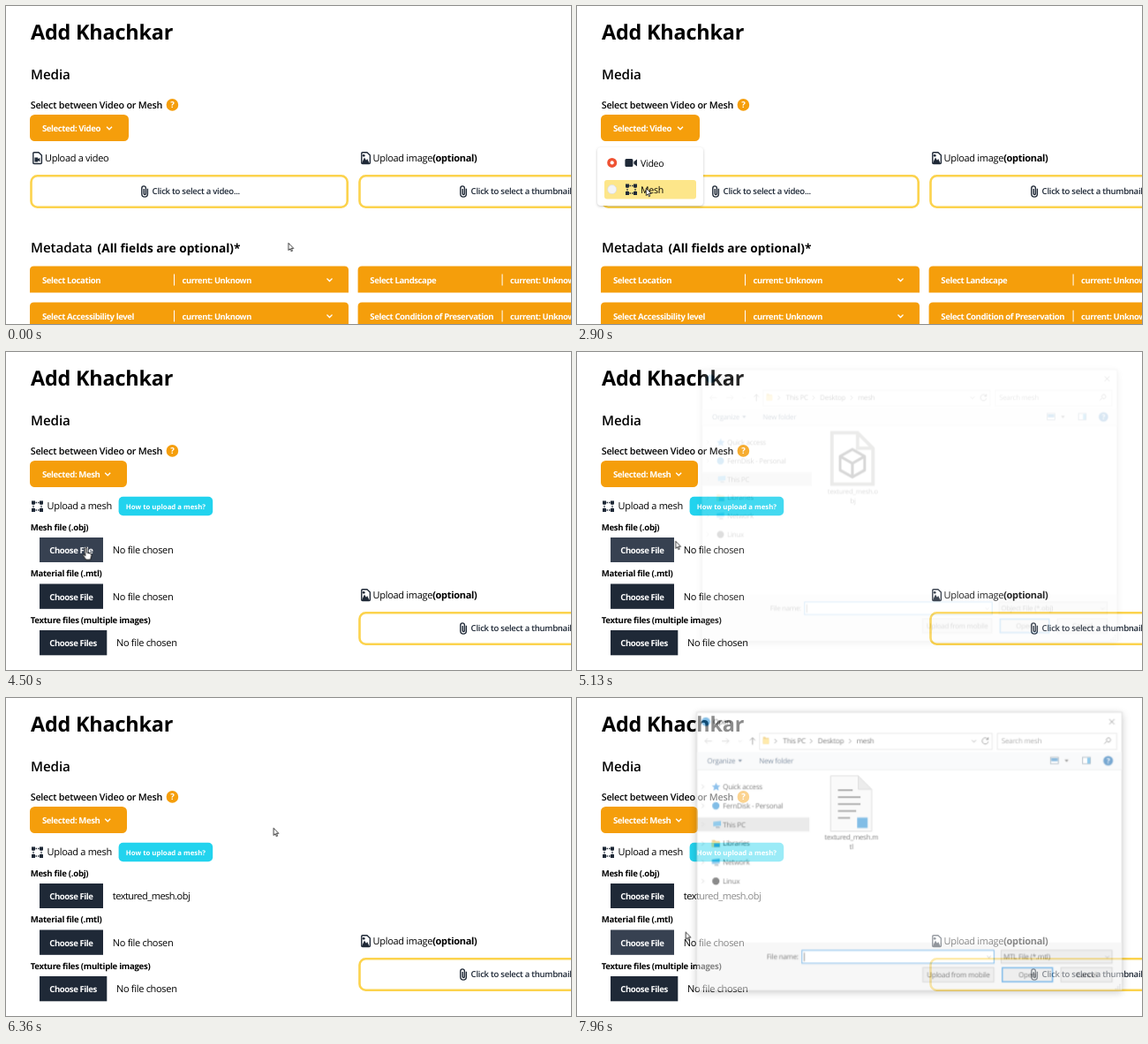
An HTML page that plays this animation: 640 by 360 pixels, repeating every 8 s.

```html
<!DOCTYPE html>
<html lang="en">
<head>
<meta charset="utf-8">
<title>Add Khachkar</title>
<style>
html, body { margin: 0; width: 100%; height: 100%; overflow: hidden; background: #fff; }
svg { display: block; width: 640px; height: 360px; }
text { font: 400 11px "Open Sans", "Noto Sans", sans-serif; letter-spacing: -.028em; white-space: pre; text-rendering: geometricPrecision; }
.h1 { font-size: 23.4px; font-weight: 700; letter-spacing: -.2px; }
.h2 { font-size: 15.2px; font-weight: 600; letter-spacing: -.1px; }
.note { font-size: 13.7px; font-weight: 700; letter-spacing: 0; }
.lead { font-size: 10.8px; font-weight: 600; letter-spacing: -.023em; }
.btn { font-size: 9.6px; font-weight: 600; letter-spacing: -.03em; }
.btn.w { font-weight: 700; letter-spacing: -.045em; }
.name { letter-spacing: -.045em; }
.b { font-weight: 700; }
.w { fill: #fff; }
.mid { text-anchor: middle; }
.amber { fill: #f59e0b; }
.ink { fill: #1f2937; }
.line { fill: none; stroke: #1f2937; stroke-width: 1.4; }
.chev { fill: none; stroke: #fff; stroke-width: 1.3; }
.frame { fill: #fff; stroke: #fcd34d; stroke-width: 2.6; }
.win text { font-size: 8.2px; fill: #1a1a1a; }
.win .nav { fill: #1e395b; }
.win .dim { fill: #6d6d6d; }
.win .file { font-size: 8px; text-anchor: middle; }
.thin { fill: none; stroke: #555; stroke-width: .9; }
.pale { stroke: #bbb; }
.ctl { fill: #e1e1e1; stroke: #adadad; stroke-width: .8; }
.blue { fill: #1b87d2; }
.shadow { filter: drop-shadow(0 2px 5px rgba(0, 0, 0, .38)); }
.soft { filter: drop-shadow(0 1px 1.5px rgba(0, 0, 0, .22)); }
.ptr { fill: #fff; stroke: #111; stroke-width: .8; stroke-linejoin: round; }

/* 1% of the loop is 80 ms */
.t { animation: 8s step-end infinite; }
.video { animation-name: video; }
.mesh { animation-name: mesh; }
#below { animation-name: below; }
#sel { animation-name: sel; }
#drop { animation-name: drop; }
#menu { animation-name: menu; }
#rowVideo { animation-name: rowVideo; }
#rowMesh { animation-name: rowMesh; }
#pick1 { animation-name: pick1; }
#pick2 { animation-name: pick2; }
#empty { animation-name: empty; }
#chosen { animation-name: chosen; }
#tip { animation-name: tip; }
#over { animation-name: over; }
.marked { animation-name: marked; }
#caret { animation-name: caret; }
.obj { animation-name: obj; }
.mtl { animation-name: mtl; }
#arrow { animation-name: arrow; }
#hand { animation-name: hand; }
#win { animation: win 8s linear infinite; transform-origin: 376.5px 173.5px; }
#cursor { animation: move 8s ease-in-out infinite; }

@keyframes video { 0% { opacity: 1 } 37.5%, 100% { opacity: 0 } }
@keyframes mesh { 0% { opacity: 0 } 37.5%, 100% { opacity: 1 } }
@keyframes below { 0% { transform: none } 37.5%, 100% { transform: translateY(103px) } }
@keyframes sel { 0%, 30%, 100% { fill: #f59e0b } 14.6% { fill: #b45309 } }
@keyframes drop { 0%, 12.5%, 100% { fill: #fff } 11.1% { fill: #fef3c7 } }
@keyframes menu { 0%, 37.5%, 100% { opacity: 0 } 24.5% { opacity: 1 } }
@keyframes rowVideo { 0%, 31.8%, 100% { opacity: 0 } 30.75% { opacity: 1 } }
@keyframes rowMesh { 0%, 37.5%, 100% { opacity: 0 } 32.6% { opacity: 1 } }
@keyframes pick1 { 0%, 76.9%, 100% { fill: #1f2937 } 48.1% { fill: #374151 } }
@keyframes pick2 { 0% { fill: #1f2937 } 89.25%, 100% { fill: #374151 } }
@keyframes empty { 0% { opacity: 1 } 76.9%, 100% { opacity: 0 } }
@keyframes chosen { 0% { opacity: 0 } 76.9%, 100% { opacity: 1 } }
@keyframes tip { 0%, 56.25%, 100% { opacity: 0 } 54.125% { opacity: 1 } }
@keyframes over { 0%, 72.5%, 100% { opacity: 0 } 70% { opacity: 1 } }
@keyframes marked { 0%, 80%, 100% { opacity: 0 } 72.5% { opacity: 1 } }
@keyframes caret { 0%, 80%, 100% { opacity: 1 } 72.5% { opacity: 0 } }
@keyframes obj { 0% { opacity: 1 } 80%, 100% { opacity: 0 } }
@keyframes mtl { 0% { opacity: 0 } 80%, 100% { opacity: 1 } }
@keyframes hand {
  0%, 12.5%, 30%, 63.75%, 98.25%, 100% { opacity: 0 }
  11.1%, 14.6%, 48.1%, 89.25% { opacity: 1 }
}
@keyframes arrow {
  0%, 12.5%, 30%, 63.75%, 98.25%, 100% { opacity: 1 }
  11.1%, 14.6%, 48.1%, 89.25% { opacity: 0 }
}
@keyframes win {
  0%, 63.75% { opacity: 0; transform: scale(.95) }
  66.25%, 75.6% { opacity: 1; transform: none }
  77.5%, 98.25% { opacity: 0; transform: scale(.95) }
  99.5%, 100% { opacity: .55; transform: scale(.981) }
}
@keyframes move {
  0%, 7.5% { transform: translate(319.6px, 268px) }
  16.625%, 27.875% { transform: translate(117px, 136px) }
  34.125% { transform: translate(78px, 206px) }
  40% { transform: translate(78px, 206px); animation-timing-function: ease-in }
  42.5% { transform: translate(99px, 190px); animation-timing-function: ease-out }
  45% { transform: translate(116.5px, 184px); animation-timing-function: ease-in }
  47.5% { transform: translate(107px, 204px); animation-timing-function: ease-out }
  50% { transform: translate(90px, 221px) }
  50.75%, 62% { transform: translate(90.5px, 221.5px) }
  72% { transform: translate(313.5px, 139px) }
  77.5% { transform: translate(313.5px, 139px); animation-timing-function: ease-in }
  82.5% { transform: translate(264px, 175px); animation-timing-function: cubic-bezier(.3, .4, .6, .95) }
  88.75% { transform: translate(109px, 262px); animation-timing-function: ease-out }
  92%, 96.25% { transform: translate(98px, 272px) }
  99.5%, 100% { transform: translate(122.8px, 264.6px) }
}
</style>
</head>
<body>
<svg viewBox="0 0 640 360">
  <defs>
    <path id="v" d="M-3-1.5 0 1.5 3-1.5"/>
    <path id="gt" d="M-1.2-2.4 1.2 0-1.2 2.4"/>
    <path id="tri" d="M-2.2-1.2h4.4L0 1.4z"/>
    <path id="doc" class="line" d="M.8 1.8q0-1.1 1.1-1.1h5L10.4 4v8.4q0 1.1-1.1 1.1H1.9q-1.1 0-1.1-1.1z"/>
    <path id="clip" class="line" d="M8.4 4v6a3.3 3.3 0 0 1-6.6 0V3.4a2.3 2.3 0 0 1 4.6 0v6.2a1.1 1.1 0 0 1-2.2 0V4.2"/>
    <g id="net">
      <path class="line" d="M2 2h9v8.5h-9z" stroke-dasharray="1.5 1"/>
      <path class="ink" d="M0 0h4v4H0zM9 0h4v4H9zM0 8.5h4v4H0zM9 8.5h4v4H9z"/>
    </g>
    <path id="cam" class="ink" d="M0 1.5Q0 0 1.5 0h6Q9 0 9 1.5v6Q9 9 7.5 9h-6Q0 9 0 7.5zM10 3.3 13.6.6v7.8L10 5.7z"/>
    <g id="bar">
      <path class="amber" d="M27 324.5V299q0-4.6 4.6-4.6h351.8q4.6 0 4.6 4.6v25.5z"/>
      <path stroke="#fff" d="M190.5 303.5v13"/>
      <text class="btn w" style="font-size:9.4px" x="199.5" y="313.5">current: Unknown</text>
      <use href="#v" class="chev" x="366.5" y="310"/>
    </g>
    <g id="folder">
      <path fill="#e8b53a" d="M0 0h3.5l1 1.2H9V8H0z"/>
      <path fill="#ffd968" d="M0 2.4h9V8H0z"/>
    </g>
    <g id="pc">
      <path fill="#3aa0dc" d="M0 1 9 0v5.6L0 6.2z"/>
      <path fill="#7b8c99" d="M3 6.6h4l1 1.6H3z"/>
    </g>
  </defs>

  <rect width="640" height="360" fill="#fff"/>
  <text class="h1" x="28" y="37.6">Add Khachkar</text>
  <text class="h2" x="28" y="82.6">Media</text>
  <text class="lead" x="27.7" y="116">Select between Video or Mesh</text>
  <circle class="amber" cx="188.4" cy="111.9" r="6.8"/>
  <text class="btn w mid" x="188.4" y="115.4">?</text>

  <g class="t video">
    <rect id="sel" class="t amber" x="27" y="123" width="112" height="30" rx="5.5"/>
    <text class="btn w" x="41" y="142">Selected: Video</text>
    <use href="#v" class="chev" x="117" y="138.3"/>
    <use href="#doc" x="30" y="165"/>
    <path class="ink" d="M32.4 171.5h3.8v1.6l2.2-1.2v4.4l-2.2-1.2v1.5h-3.8z"/>
    <text x="44" y="176.4">Upload a video</text>
    <rect id="drop" class="t frame" x="28.5" y="192.3" width="358.2" height="35.4" rx="7"/>
    <use href="#clip" x="152" y="202.8"/>
    <text class="btn ink" x="165.6" y="213">Click to select a video...</text>
  </g>

  <g id="below" class="t">
    <use href="#doc" x="402" y="165"/>
    <path class="ink" d="M403 178l3-6.4 2 3.2 1.2-1.8 2.4 5z"/>
    <circle class="ink" cx="405.2" cy="169.3" r="1.4"/>
    <text x="415.6" y="176.4">Upload image<tspan class="b">(optional)</tspan></text>
    <rect class="frame" x="400.5" y="192.3" width="358.2" height="35.4" rx="7"/>
    <use href="#clip" x="513" y="202.8"/>
    <text class="btn ink" x="526.6" y="213">Click to select a thumbnail...</text>
    <text class="h2" x="28" y="279">Metadata</text>
    <text class="note" x="103.6" y="279">(All fields are optional)*</text>
    <use href="#bar"/>
    <use href="#bar" x="371.6"/>
    <use href="#bar" y="41"/>
    <use href="#bar" x="371.6" y="41"/>
    <text class="btn w" x="41" y="313.5">Select Location</text>
    <text class="btn w" x="412.3" y="313.5">Select Landscape</text>
    <text class="btn w" x="41" y="354.5">Select Accessibility level</text>
    <text class="btn w" x="412.3" y="354.5">Select Condition of Preservation</text>
  </g>

  <g class="t mesh">
    <rect class="amber" x="27" y="123" width="110" height="30" rx="5.5"/>
    <text class="btn w" x="41" y="142">Selected: Mesh</text>
    <use href="#v" class="chev" x="115.2" y="138.3"/>
    <use href="#net" x="29" y="168.5"/>
    <text x="46.6" y="178.4">Upload a mesh</text>
    <rect x="127.6" y="163.7" width="106.6" height="21.6" rx="5" fill="#22d3ee"/>
    <text class="btn w" style="font-size:7.8px;letter-spacing:0" x="135.8" y="177.5">How to upload a mesh?</text>
    <text class="btn b" x="27.7" y="201.8">Mesh file (.obj)</text>
    <text class="btn b" x="27.7" y="254.4">Material file (.mtl)</text>
    <text class="btn b" x="27.7" y="307">Texture files (multiple images)</text>
    <rect id="pick1" class="t ink" x="38" y="210" width="72" height="28"/>
    <rect id="pick2" class="t ink" x="38" y="262.5" width="72" height="28.3"/>
    <rect class="ink" x="38" y="315" width="76.3" height="28.3"/>
    <text class="btn w" x="49.3" y="228">Choose File</text>
    <text class="btn w" x="49.3" y="280.6">Choose File</text>
    <text class="btn w" x="49.3" y="333.2">Choose Files</text>
    <text id="empty" class="t" x="120.8" y="228">No file chosen</text>
    <text id="chosen" class="t name" x="120.8" y="228">textured_mesh.obj</text>
    <text x="120.8" y="280.6">No file chosen</text>
    <text x="125" y="333.2">No file chosen</text>
  </g>

  <g id="menu" class="t">
    <rect class="w soft" x="23" y="160" width="120" height="66" rx="4"/>
    <rect id="rowVideo" class="t" x="31" y="167" width="104" height="21" rx="3" fill="#fde68a"/>
    <rect id="rowMesh" class="t" x="31" y="197" width="104" height="21.4" rx="3" fill="#fde68a"/>
    <circle cx="39.7" cy="177.4" r="5.5" fill="#ef5233"/>
    <circle class="w" cx="39.7" cy="177.4" r="2.1"/>
    <circle cx="39.7" cy="207.6" r="5" fill="#f3f4f6" stroke="#d9dce0" stroke-width=".7"/>
    <use href="#cam" x="54.4" y="173"/>
    <use href="#net" x="55" y="201.5"/>
    <text x="72" y="181.8" style="font-size:10.6px">Video</text>
    <text x="72" y="212" style="font-size:10.6px">Mesh</text>
  </g>

  <g id="tip" class="t win">
    <rect class="soft" x="98.5" y="238" width="58.5" height="12" fill="#fff" stroke="#aaa" stroke-width=".6"/>
    <text x="101.5" y="246.9">No file chosen</text>
  </g>

  <g id="win" class="win">
    <rect class="shadow" x="131" y="13" width="491" height="321" fill="#fff" stroke="#a5a5a5" stroke-width=".6"/>
    <circle class="blue" cx="141.5" cy="24" r="5"/>
    <text x="150" y="27">Open</text>
    <path class="thin" d="M607.3 21l6 6m0-6-6 6"/>

    <path class="thin pale" d="M148.5 46.3h-8m3-3-3 3 3 3M160 46.3h8m-3-3 3 3-3 3"/>
    <use href="#v" class="thin pale" transform="translate(181 46.5) scale(.6)"/>
    <path class="thin" d="M195.4 50.5v-8m-3 3 3-3 3 3"/>
    <rect x="203.5" y="37.5" width="268.5" height="18.5" fill="#fff" stroke="#d9d9d9"/>
    <use href="#folder" transform="translate(207.5 41.5) scale(.75 1)"/>
    <g class="thin">
      <use href="#gt" x="222" y="46.4"/>
      <use href="#gt" x="263" y="46.4"/>
      <use href="#gt" x="308" y="46.4"/>
      <use href="#v" transform="translate(451 46.4) scale(.8)"/>
      <path d="M467 44a3.6 3.6 0 1 0 .6 3.2M467.6 42v2.6H465"/>
    </g>
    <text x="230.6" y="49.2">This PC</text>
    <text x="270.8" y="49.2">Desktop</text>
    <text x="315.4" y="49.2">mesh</text>
    <rect x="478" y="37.5" width="138" height="18.5" fill="#fff" stroke="#d9d9d9"/>
    <text class="dim" x="482.7" y="49.2">Search mesh</text>
    <path class="thin" d="M601.5 49.5l3-3a2.4 2.4 0 1 1 .4.4"/>

    <rect x="131.3" y="59" width="490.4" height="20.5" fill="#f5f6f7"/>
    <path stroke="#e4e6e8" d="M131.3 79.5h490.4"/>
    <text class="nav" x="143" y="72">Organize</text>
    <use href="#tri" x="181" y="69" class="nav"/>
    <text class="nav" x="203" y="72">New folder</text>
    <rect x="539.5" y="65" width="9" height="7.5" fill="#fff" stroke="#60788c" stroke-width=".8"/>
    <path fill="#2c83c4" d="M540.3 66h7.4v3.6h-7.4z"/>
    <use href="#tri" x="558" y="69" fill="#444"/>
    <rect x="576.5" y="65" width="9" height="7.5" fill="#fff" stroke="#60788c" stroke-width=".8"/>
    <path fill="#3aa0dc" d="M581.8 65.4h3.4v6.8h-3.4z"/>
    <circle cx="606" cy="69" r="5.6" fill="#0a62ad"/>
    <text class="b mid" style="fill:#fff" x="606" y="72">?</text>

    <rect x="131.3" y="134.5" width="129.7" height="16" fill="#d9d9d9"/>
    <g class="thin pale">
      <use href="#gt" x="138" y="99"/>
      <use href="#gt" x="138" y="121"/>
      <use href="#gt" x="138" y="142.5"/>
      <use href="#gt" x="138" y="164.5"/>
      <use href="#gt" x="138" y="186"/>
      <use href="#gt" x="138" y="208"/>
    </g>
    <path fill="#3390dd" d="M153.3 94.2l1.4 3.3 3.5.3-2.6 2.3.8 3.5-3.1-1.8-3.1 1.8.8-3.5-2.6-2.3 3.5-.3z"/>
    <circle class="blue" cx="153" cy="121" r="4.2"/>
    <use href="#pc" x="150" y="138.5"/>
    <use href="#folder" x="148.5" y="160.5"/>
    <path class="blue" d="M151 164.5h6.5v4H151z"/>
    <use href="#pc" x="148.5" y="182"/>
    <circle cx="153" cy="208" r="4.2" fill="#2b2b2b"/>
    <text x="161" y="102">Quick access</text>
    <text x="161" y="124">FernDisk - Personal</text>
    <text x="161" y="145.5">This PC</text>
    <text x="161" y="167.3">Libraries</text>
    <text x="161" y="189">Network</text>
    <text x="161" y="210.8">Linux</text>

    <rect id="over" class="t" x="274" y="84.5" width="71" height="90" fill="#e5f3ff"/>
    <rect class="t marked" x="274.4" y="84.5" width="70.4" height="90" fill="#cce8ff" stroke="#99d1ff" stroke-width=".8"/>
    <g class="t obj">
      <path d="M284.8 87.8h30.4l18.2 18.2v42.6h-48.6zM315.2 87.8V106h18.2" fill="#fff" stroke="#7d7d78" stroke-width="4"/>
      <path d="M309 107.4l14.5 8.2v16.4L309 140.2l-14.5-8.2v-16.4zM294.5 115.6 309 123.8l14.5-8.2M309 123.8v16.4" fill="none" stroke="#000" stroke-width="3.2" stroke-linejoin="round"/>
      <text class="file" x="309.5" y="160">textured_mesh.o</text>
      <text class="file" x="309.5" y="170.5">bj</text>
    </g>
    <g class="t mtl">
      <path d="M285.5 86.5h32l15.5 15.5v48.5h-47.5z" fill="#f6f6f6" stroke="#c4c4c4"/>
      <path d="M317.5 86.5V102H333z" fill="#dcdcdc" stroke="#c4c4c4"/>
      <path d="M294 103h17m-17 8h26m-26 8h26m-26 8h21m-21 8h14" stroke="#707070" stroke-width="2"/>
      <rect class="blue" x="316.2" y="134.6" width="12" height="12"/>
      <text class="file" x="309.5" y="160">textured_mesh.m</text>
      <text class="file" x="309.5" y="170.5">tl</text>
    </g>

    <rect x="131.3" y="279" width="490.4" height="54.7" fill="#f0f0f0"/>
    <text text-anchor="end" x="248.5" y="298.3">File name:</text>
    <rect x="252.4" y="287.8" width="221.8" height="15" fill="#fff" stroke="#0078d7" stroke-width=".9"/>
    <text class="t marked" x="254" y="298.3">textured_mesh.obj</text>
    <path id="caret" class="t" stroke="#111" stroke-width=".8" d="M255.2 290.5v10"/>
    <rect class="ctl" x="482.4" y="287.8" width="128.2" height="15"/>
    <text class="t obj" x="485" y="298.3">Object File (*.obj)</text>
    <text class="t mtl" x="485" y="298.3">MTL File (*.mtl)</text>
    <g class="thin">
      <use href="#v" transform="translate(468.5 295.5) scale(.7)"/>
      <use href="#v" transform="translate(605 295.5) scale(.7)"/>
    </g>
    <rect class="ctl" x="392" y="307.8" width="82" height="16.4"/>
    <rect x="483.7" y="308" width="58" height="16" fill="#e1e1e1" stroke="#0078d7" stroke-width="1.4"/>
    <rect class="ctl" x="551.4" y="307.8" width="59.2" height="16.4"/>
    <text class="mid" x="433" y="319">Upload from mobile</text>
    <text class="mid" x="512.6" y="319">Open</text>
    <text class="mid" x="581" y="319">Cancel</text>
    <path fill="#aaa" d="M619 327h1.3v1.3H619zM619 329.4h1.3v1.3H619zM619 331.8h1.3v1.3H619zM616.6 329.4h1.3v1.3h-1.3zM616.6 331.8h1.3v1.3h-1.3zM614.2 331.8h1.3v1.3h-1.3z"/>
  </g>

  <g id="cursor">
    <path id="arrow" class="t ptr" d="M.3.3V8.6L2.2 6.8 3.5 9.8 4.8 9.2 3.5 6.4H6.1z"/>
    <g id="hand" class="t">
      <path class="ptr" transform="translate(-3.6) scale(1.25)" d="M2.2.9c0-1.1 1.6-1.1 1.6 0v3.6l2.6.6c1.2.3 1.6.9 1.5 2L7.4 9.3 6.9 11H3L.4 7.4C-.2 6.4.7 5.9 1.4 6.6l.8.9z"/>
    </g>
  </g>
</svg>
</body>
</html>
```
